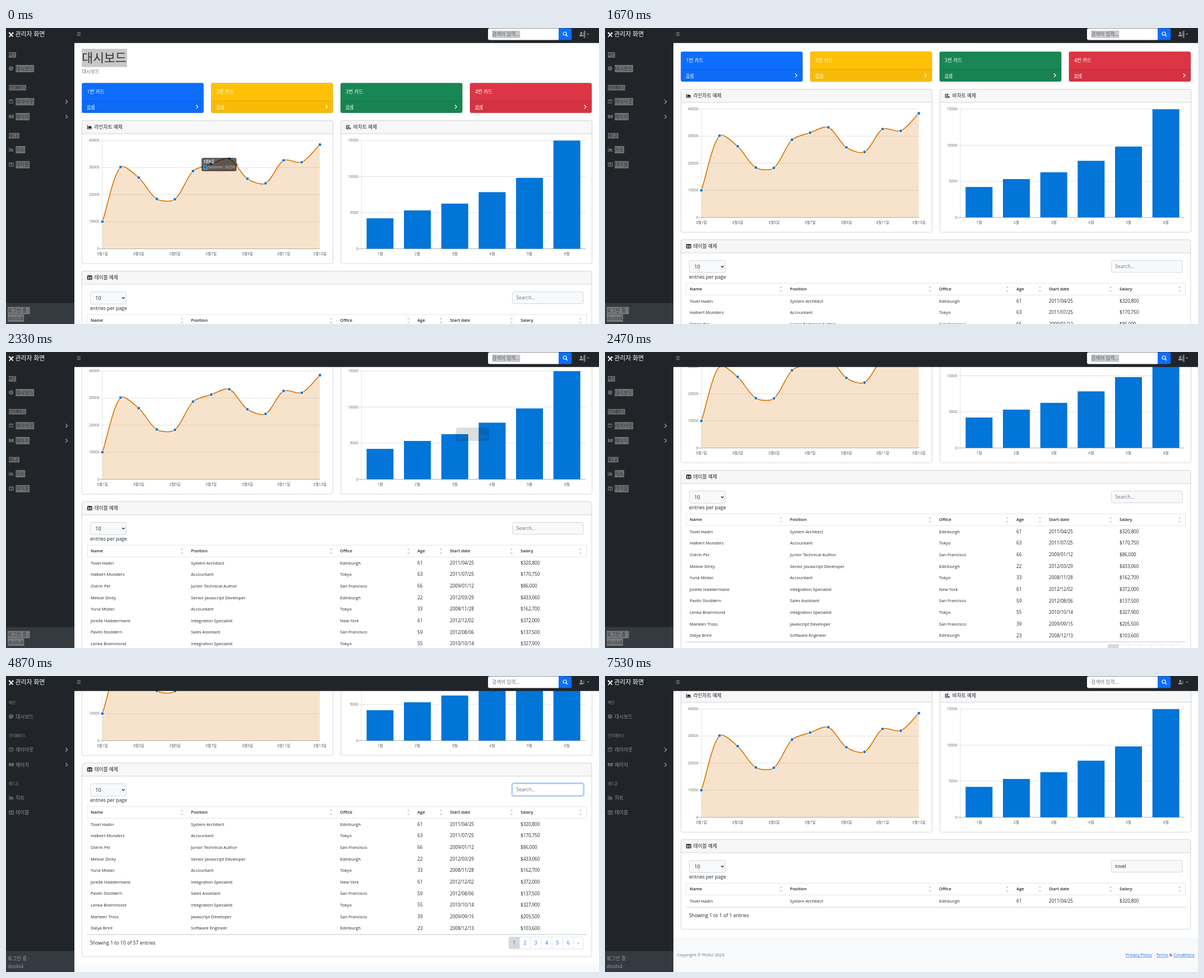
Write an HTML page with a canvas that moves like this. It is 1058 by 529 pixels and loops after 8000 ms.

```html
<!DOCTYPE html>
<html lang="ko">
<head>
<meta charset="utf-8">
<title>관리자 화면</title>
<style>
html, body { margin: 0; width: 100%; height: 100%; overflow: hidden; background: #fff; }
canvas { display: block; width: 1058px; height: 529px; }
</style>
</head>
<body>
<canvas id="stage"></canvas>
<script>
const W = 1058, H = 529, LOOP = 8000;
const FONT = '"Open Sans", "Noto Sans CJK KR", "Noto Sans CJK JP", "Noto Sans", sans-serif';
const INK = '#212529', MUTED = '#6c757d', BLUE = '#0d6efd', SERIES = '#0275d8';
const EDGE = 'rgba(0,0,0,.16)', GRID = 'rgba(0,0,0,.11)', DIM = 'rgba(255,255,255,.5)';
const SELECTION = 'rgba(163,163,163,.6)';
const BODY = 8.67, SMALL = 7.65, TINY = 6.5;

const canvas = document.getElementById('stage');
const dpr = window.devicePixelRatio || 1;
canvas.width = W * dpr;
canvas.height = H * dpr;
const c = canvas.getContext('2d');

const visits = [10000, 30162, 26263, 18394, 18287, 28682, 31274, 33259, 25849, 24159, 32651, 31984, 38451];
const revenue = [4215, 5312, 6251, 7841, 9821, 14984];
const columns = [[151, 'Name', 314], [330, 'Position', 580], [596, 'Office', 718],
  [734, 'Age', 776], [792, 'Start date', 902], [918, 'Salary', 1025]];
const people = [
  'Tovel Hadin|System Architect|Edinburgh|61|2011/04/25|$320,800',
  'Halbert Munders|Accountant|Tokyo|63|2011/07/25|$170,750',
  'Ostrin Pel|Junior Technical Author|San Francisco|66|2009/01/12|$86,000',
  'Melvar Dinty|Senior Javascript Developer|Edinburgh|22|2012/03/29|$433,060',
  'Yuna Mobei|Accountant|Tokyo|33|2008/11/28|$162,700',
  'Jorelle Haddermane|Integration Specialist|New York|61|2012/12/02|$372,000',
  'Pavlin Stoddern|Sales Assistant|San Francisco|59|2012/08/06|$137,500',
  'Lenka Brammond|Integration Specialist|Tokyo|55|2010/10/14|$327,900',
  'Marleen Tross|Javascript Developer|San Francisco|39|2009/09/15|$205,500',
  'Dalya Brint|Software Engineer|Edinburgh|23|2008/12/13|$103,600'
].map(row => row.split('|'));

const clamp = v => Math.max(0, Math.min(1, v));
const rest = p => Math.pow(1 - clamp(p), 4);

// Value of the last [time, value] pair already reached.
function at(t, keys) {
  let value = keys[0][1];
  for (const [time, v] of keys) if (t >= time) value = v;
  return value;
}

function text(s, x, y, size, color, weight = 400, align = 'left') {
  c.font = `${weight} ${size}px ${FONT}`;
  c.textAlign = align;
  c.fillStyle = color;
  c.fillText(s, x, y + size * 0.36);
  return c.measureText(s).width;
}

function selectable(s, x, y, size, color, weight, selected, picked = '#323232') {
  if (selected) {
    c.font = `${weight} ${size}px ${FONT}`;
    rect(x, y - size * 0.75, c.measureText(s).width + 1, size * 1.5, SELECTION);
  }
  text(s, x, y, size, selected ? picked : color, weight);
}

function rect(x, y, w, h, color) {
  c.fillStyle = color;
  c.fillRect(x, y, w, h);
}

function box(x, y, w, h, r, fill, stroke, width = 1) {
  c.beginPath();
  c.roundRect(x, y, w, h, r);
  if (fill) { c.fillStyle = fill; c.fill(); }
  if (stroke) { c.strokeStyle = stroke; c.lineWidth = width; c.stroke(); }
}

function trace(points) {
  c.beginPath();
  for (let i = 0; i < points.length; i += 2) c.lineTo(points[i], points[i + 1]);
}

function line(points, color, width = 1) {
  trace(points);
  c.strokeStyle = color;
  c.lineWidth = width;
  c.stroke();
}

function poly(points, color) {
  trace(points);
  c.fillStyle = color;
  c.fill();
}

function disc(x, y, r, color) {
  c.beginPath();
  c.arc(x, y, r, 0, 7);
  c.fillStyle = color;
  c.fill();
}

function chevron(x, y, color) {
  line([x - 1.6, y - 3.3, x + 1.6, y, x - 1.6, y + 3.3], color, 1.2);
}

const icons = {
  area(x, y, k) {
    line([x + .6, y - 3.6, x + .6, y + 3.2, x + 8.6, y + 3.2], k, 1.1);
    poly([x + 2, y + 2, x + 2, y - .4, x + 3.8, y - 2.6, x + 5.2, y - .9, x + 6.4, y - 1.9, x + 8, y + .3, x + 8, y + 2], k);
  },
  bars(x, y, k) {
    line([x + .6, y - 3.6, x + .6, y + 3.2, x + 8.6, y + 3.2], k, 1.1);
    [4.6, 3, 6].forEach((w, i) => rect(x + 2, y - 3.2 + i * 2, w, 1.2, k));
  },
  table(x, y, k) {
    box(x + .6, y - 3.2, 7.8, 6.6, 1, null, k, 1.2);
    rect(x + .6, y - 3.2, 7.8, 1.8, k);
    line([x + 4.5, y - 2, x + 4.5, y + 3.2], k);
    line([x + .6, y + 1, x + 8.4, y + 1], k);
  },
  columns(x, y, k) {
    box(x + .6, y - 3, 7, 6, 1, null, k, 1.1);
    rect(x + .6, y - 3, 7, 1.5, k);
    line([x + 4.1, y - 3, x + 4.1, y + 3], k);
  },
  gauge(x, y, k) {
    disc(x + 4, y, 4, k);
    line([x + 4, y + 1.6, x + 4, y - 2], INK, .9);
  },
  book(x, y, k) {
    poly([x, y - 3.2, x + 4.2, y - 2.6, x + 4.2, y + 3.4, x, y + 2.8], k);
    poly([x + 9, y - 3.2, x + 4.8, y - 2.6, x + 4.8, y + 3.4, x + 9, y + 2.8], k);
  }
};

function panel(x, y, w, h, icon, title) {
  box(x, y, w, h, 3.2, '#fff', EDGE);
  box(x, y, w, 23.5, [3.2, 3.2, 0, 0], 'rgba(0,0,0,.03)');
  line([x, y + 23.5, x + w, y + 23.5], EDGE);
  icons[icon](x + 9.3, y + 11.5, INK);
  text(title, x + 22.3, y + 11.7, BODY, INK);
}

function axes(left, right, max, steps) {
  for (let i = 0; i <= steps; i++) {
    const y = 394.5 - i * 193.5 / steps;
    line([left - 5, y, right, y], i ? GRID : 'rgba(0,0,0,.3)');
    text(String(max * i / steps), left - 5.5, y - .3, TINY, '#666', 400, 'right');
  }
  line([left, 201, left, 399], GRID);
}

// Smooth curve whose handles follow the neighbouring points.
function curve(pts, tension) {
  const handles = pts.map((p, i) => {
    const a = pts[i - 1] || p, b = pts[i + 1] || p;
    const da = Math.hypot(p.x - a.x, p.y - a.y), db = Math.hypot(b.x - p.x, b.y - p.y);
    const fa = tension * da / (da + db), fb = tension * db / (da + db);
    const lim = y => Math.max(201, Math.min(394.5, y));
    return {
      inX: p.x - fa * (b.x - a.x), inY: lim(p.y - fa * (b.y - a.y)),
      outX: p.x + fb * (b.x - a.x), outY: lim(p.y + fb * (b.y - a.y))
    };
  });
  c.moveTo(pts[0].x, pts[0].y);
  for (let i = 1; i < pts.length; i++) {
    const o = handles[i - 1], n = handles[i];
    c.bezierCurveTo(o.outX, o.outY, n.inX, n.inY, pts[i].x, pts[i].y);
  }
}

function tooltip(tipX, y, side, w, title, label, alpha) {
  if (alpha < .005) return;
  const x = side > 0 ? tipX - 2.7 - w : tipX + 2.7;
  const edge = side > 0 ? x + w : x;
  c.save();
  c.globalAlpha = alpha;
  box(x, y - 12, w, 24, 3.2, 'rgba(0,0,0,.8)');
  poly([edge, y - 2.7, tipX, y, edge, y + 2.7], 'rgba(0,0,0,.8)');
  text(title, x + 3.5, y - 5.3, TINY, '#fff', 700);
  box(x + 3.8, y + 2.2, 6, 6, 0, SERIES, '#fff', .7);
  text(label, x + 11.6, y + 5, TINY, '#fff');
  c.restore();
}

function lineChart(t) {
  panel(135.5, 165.5, 448, 255.5, 'area', '라인차트 예제');
  axes(172, 560, 40000, 4);
  const pts = visits.map((v, i) => ({ x: 172 + i * 388 / 12, y: 394.5 - v * 193.5 / 40000 }));
  c.beginPath();
  curve(pts, .3);
  c.strokeStyle = '#d87502';
  c.lineWidth = 1.65;
  c.stroke();
  c.lineTo(560, 394.5);
  c.lineTo(172, 394.5);
  c.fillStyle = 'rgba(216,117,2,.2)';
  c.fill();
  pts.forEach((p, i) => {
    disc(p.x, p.y, 3.2, 'rgba(255,255,255,.85)');
    disc(p.x, p.y, 2.4, SERIES);
    if (i % 2 === 0) text(`3월${i + 1}일`, p.x, 404, 6.7, '#555', 400, 'center');
  });
  const p = (t - 130) / 400, k = rest(p), moved = t >= 130;
  tooltip(525 - 111 * k, 240 + 4 * k, 1, 62.5, moved ? '3월12일' : '3월8일',
    'Sessions: ' + visits[moved ? 11 : 7], .78 * Math.pow(1 - clamp(p), 2));
}

function barChart(t) {
  panel(597.5, 165.5, 448, 255.5, 'bars', '바차트 예제');
  axes(634, 1034, 15000, 3);
  revenue.forEach((v, i) => {
    const x = 634 + (i + .5) * 400 / 6, h = v * 193.5 / 15000;
    rect(x - 24, 394.5 - h, 48, h, SERIES);
    text(`${i + 1}월`, x, 404, 6.7, '#555', 400, 'center');
  });
  const show = 1 - rest((t - 1915) / 400), hide = rest((t - 2185) / 400);
  tooltip(800.5, 314, -1, 59, '3월', 'Revenue: ' + revenue[2], show * hide);
}

function cards() {
  [BLUE, '#ffc107', '#198754', '#dc3545'].forEach((color, i) => {
    const x = 135.3 + i * 230.8;
    box(x, 98.3, 217.3, 53.5, 3.2, color, 'rgba(0,0,0,.14)', .8);
    rect(x, 130, 217.3, 21.5, 'rgba(0,0,0,.03)');
    line([x, 130.3, x + 217.3, 130.3], 'rgba(0,0,0,.16)', .8);
    text(`${i + 1}번 카드`, x + 9.2, 114, BODY, '#fff');
    const w = text('상세', x + 9, 141, SMALL, '#fff');
    line([x + 9, 145.2, x + 9 + w, 145.2], '#fff', .7);
    chevron(x + 205.6, 140.8, '#fff');
  });
}

function searchBox(t) {
  const focus = clamp((t - 4290) / 180) * (1 - clamp((t - 7370) / 150));
  const query = at(t, [[0, ''], [5470, 't'], [5670, 'to'], [5930, 'tov'], [6130, 'tove'], [6400, 'tovel']]);
  const caret = at(t, [[0, 0], [4330, 1], [4870, 0], [5400, 1], [7000, 0]]);
  if (focus) box(902.4, 470.4, 128.8, 23.4, 4, null, `rgba(13,110,253,${.27 * focus})`, 2.6);
  box(903.5, 471.5, 126.5, 21.2, 3, '#f8f9fa', '#ced4da', .9);
  if (focus) {
    c.globalAlpha = focus;
    box(903.5, 471.5, 126.5, 21.2, 3, '#fff', '#86b7fe', .9);
    c.globalAlpha = 1;
  }
  const w = text(query || 'Search...', 910.3, 482, BODY, query ? INK : MUTED);
  if (caret) rect(910.2 + (query ? w : 0), 475.3, .8, 13.5, INK);
  if (query && t < 7400) {
    line([1015.8, 480.8, 1020.4, 485.4], '#1c3f72', 1.4);
    line([1020.4, 480.8, 1015.8, 485.4], '#1c3f72', 1.4);
  }
}

function pager(y) {
  box(897, y - 10.7, 133, 21.4, 3, '#fff', '#dee2e6', .9);
  box(897, y - 10.7, 19.4, 21.4, [3, 0, 0, 3], '#d8d8d8');
  [...'123456›'].forEach((s, i) => {
    const x = 897 + i * 19.3;
    if (i) line([x, y - 10.7, x, y + 10.7], '#dee2e6', .9);
    text(s, i < 6 ? x + 9.7 : 1021.3, y, BODY, BLUE, 400, 'center');
  });
}

function tablePanel(t) {
  const found = t >= 5930;
  const rows = found ? people.slice(0, 1) : people;
  const end = 534 + rows.length * 20.65;
  panel(135.5, 434.5, 909.5, end + 39.8 - 434.5, 'table', '테이블 예제');
  box(150.5, 471.5, 64, 21.8, 3, '#f8f9fa', '#ced4da', .9);
  text('10', 159.3, 482.5, 9.2, INK);
  line([207.2, 481.3, 209.4, 483.6, 211.6, 481.3], INK, 1.3);
  text('entries per page', 150, 500.6, BODY, INK);
  searchBox(t);

  box(144.7, 512.2, 891, 21, 0, null, '#dfe2e5', .9);
  columns.forEach(([x, label, arrow]) => {
    text(label, x, 522.6, SMALL, INK, 600);
    poly([arrow - 2.2, 520.3, arrow, 518, arrow + 2.2, 520.3], '#b9b9b9');
    poly([arrow - 2.2, 525.5, arrow, 527.8, arrow + 2.2, 525.5], '#b9b9b9');
  });
  rows.forEach((row, i) => row.forEach((cell, j) =>
    text(cell, columns[j][0], 543.9 + i * 20.64, j > 2 ? 8.1 : SMALL, INK)));
  line([144.5, end + .6, 1035.7, end + .6], '#cdd0d3', 1.1);

  const total = t >= 5530 ? 51 : 57;
  text(found ? 'Showing 1 to 1 of 1 entries' : `Showing 1 to 10 of ${total} entries`, 150, end + 15.5, BODY, INK);
  if (!found) pager(end + 15.6);
  footer(end + 54);
}

function footer(y) {
  rect(122, y, W - 122, 70, '#f8f9fa');
  const mid = y + 32;
  text('Copyright © PKNU 2023.', 128.5, mid, 7.6, MUTED);
  [[929, 'Privacy Policy'], [983.3, 'Terms'], [1014.3, 'Conditions']].forEach(([x, s]) => {
    const w = text(s, x, mid, 7.5, BLUE);
    line([x, mid + 4, x + w, mid + 4], BLUE, .7);
  });
  text('·', 979.4, mid, 7.6, INK);
  text('&', 1006.7, mid, 7.6, INK);
}

function sidebar(selected) {
  rect(0, 0, 122, H, INK);
  [[48, '메인'], [106.7, '인터페이스'], [192.5, '애드온']].forEach(([y, s]) =>
    selectable(s, 5, y, TINY, 'rgba(255,255,255,.3)', 700, selected));
  [[72.5, '대시보드', 'gauge'], [131.7, '레이아웃', 'columns'], [158.4, '페이지', 'book'],
    [217.5, '차트', 'area'], [244.3, '테이블', 'table']].forEach(([y, s, icon]) => {
    icons[icon](5, y - .3, '#62666a');
    selectable(s, 17.3, y, BODY, DIM, 400, selected);
  });
  chevron(108, 131.7, '#a8aaac');
  chevron(108, 158.4, '#a8aaac');
  rect(0, 491.5, 122, 38, '#343a40');
  selectable('로그인 중 :', 3, 505, BODY, DIM, 400, selected);
  selectable('doobi4', 3, 518.5, BODY, DIM, 400, selected);
}

function topbar(selected) {
  rect(0, 0, W, 26.8, INK);
  line([5.6, 8.2, 12.6, 15.6], '#fff', 1.7);
  line([12.8, 8.4, 5.6, 15.8], '#fff', 1.7);
  disc(6.3, 9, 1.4, '#fff');
  disc(12, 9.2, 1.4, '#fff');
  text('관리자 화면', 16.6, 11.5, 10.84, '#fff');
  [8.3, 10.9, 13.5].forEach(y => line([126.8, y, 133, y], '#909294', 1));

  box(860, .5, 126, 21, [3, 0, 0, 3], '#fff');
  selectable('검색어 입력...', 867.3, 11.3, BODY, MUTED, 400, selected, '#5d646a');
  box(986, .5, 23.3, 21, [0, 3, 3, 0], BLUE);
  c.beginPath();
  c.arc(997, 10, 3, 0, 7);
  c.strokeStyle = '#fff';
  c.lineWidth = 1.2;
  c.stroke();
  line([999.2, 12.2, 1002, 15], '#fff', 1.4);

  disc(1026.3, 9.1, 2, '#909294');
  box(1023, 11.6, 6.6, 3.4, [2.5, 2.5, 0, 0], '#909294');
  rect(1030, 8.2, 1.6, 6.4, '#66696c');
  if (selected) rect(1030.8, 4.8, 3, 13, SELECTION);
  poly([1036, 9.9, 1040.6, 9.9, 1038.3, 12.2], '#909294');
}

function draw(t) {
  const selected = t < 4330;
  const scroll = at(t, [[0, 0], [1670, 56], [1930, 111.5], [2185, 167], [2465, 223], [3530, 279], [5930, 142]]);
  c.setTransform(dpr, 0, 0, dpr, 0, 0);
  rect(0, 0, W, H, '#fff');
  c.save();
  c.translate(0, -scroll);
  selectable('대시보드', 135.2, 53.5, 21.68, INK, 500, selected);
  text('대시보드', 135.2, 78, BODY, MUTED);
  cards();
  lineChart(t);
  barChart(t);
  tablePanel(t);
  c.restore();
  sidebar(selected);
  topbar(selected);
}

function frame() {
  draw(performance.now() % LOOP);
  requestAnimationFrame(frame);
}
frame();
</script>
</body>
</html>
```
